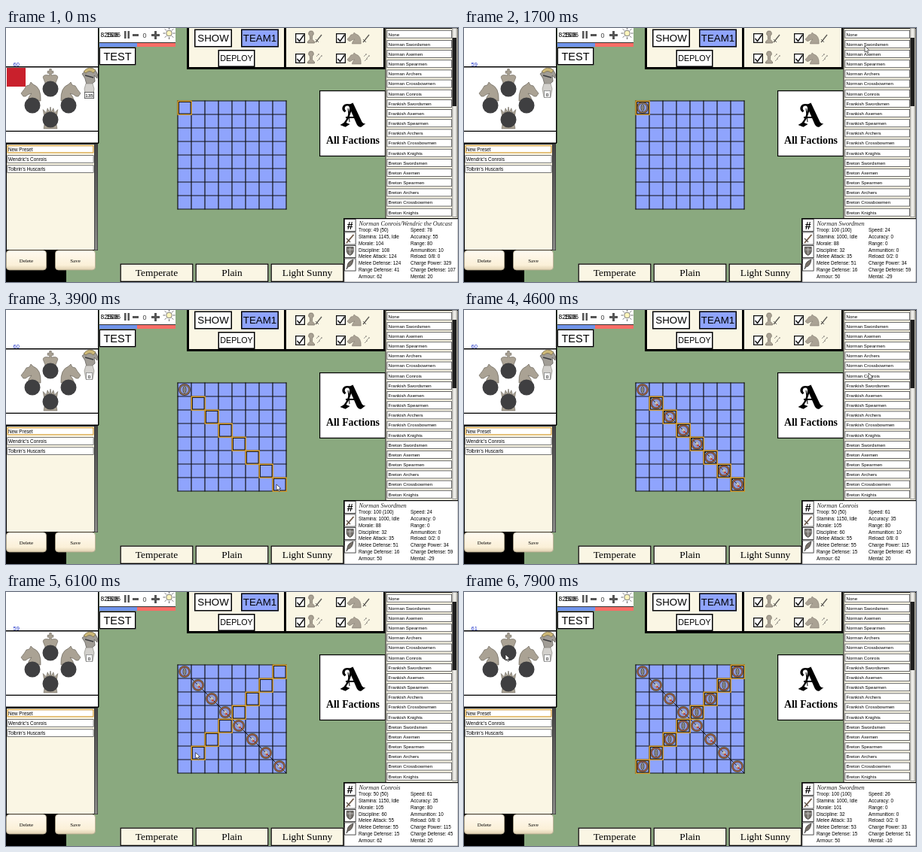
These frames come from a looping animation (600x338 px, 8 s). An HTML page with a canvas:

```html
<!DOCTYPE html>
<html lang="en">
<head>
<meta charset="utf-8">
<title>Deployment screen</title>
<style>
html, body { margin: 0; width: 100%; height: 100%; overflow: hidden; background: #8aa97f; }
canvas { display: block; }
</style>
</head>
<body>
<canvas id="stage" width="600" height="338"></canvas>
<script>
const g = document.getElementById('stage').getContext('2d');
const LOOP = 8000;
const SANS = '"Liberation Sans", Arial, sans-serif';
const SERIF = '"Liberation Serif", "Times New Roman", serif';
const CREAM = '#faf6e4', BLUE = '#8fa4fd', TAN = '#aaa294', EDGE = '#6b655b', DARK = '#3f3f41', GOLD = '#e5a62b';
const GRID = { x: 228, y: 97, cell: 18, n: 8 };

const ranks = ['Swordsmen', 'Axemen', 'Spearmen', 'Archers', 'Crossbowmen'];
const troops = ['None'];
for (const [people, riders] of [['Norman', 'Conrois'], ['Frankish', 'Knights'], ['Breton', 'Knights']])
  for (const r of [...ranks, riders]) troops.push(people + ' ' + r);

const cards = {
  lord: ['Norman Conrois/Wendric the Outcast',
    'Troop: 49 (50)|Stamina: 1145, Idle|Morale: 104|Discipline: 108|Melee Attack: 124|Melee Defense: 124|Range Defense: 41|Armour: 62',
    'Speed: 78|Accuracy: 55|Range: 80|Ammunition: 10|Reload: 0/8: 0|Charge Power: 329|Charge Defense: 107|Mental: 20'],
  sword: ['Norman Swordmen',
    'Troop: 100 (100)|Stamina: 1000, Idle|Morale: 88|Discipline: 32|Melee Attack: 35|Melee Defense: 51|Range Defense: 16|Armour: 50',
    'Speed: 24|Accuracy: 0|Range: 0|Ammunition: 0|Reload: 0/2: 0|Charge Power: 34|Charge Defense: 59|Mental: -29'],
  horse: ['Norman Conrois',
    'Troop: 50 (50)|Stamina: 1150, Idle|Morale: 105|Discipline: 60|Melee Attack: 55|Melee Defense: 55|Range Defense: 15|Armour: 62',
    'Speed: 61|Accuracy: 35|Range: 80|Ammunition: 10|Reload: 0/8: 0|Charge Power: 115|Charge Defense: 45|Mental: 20'],
  guard: ['Norman Swordmen',
    'Troop: 100 (100)|Stamina: 1000, Idle|Morale: 101|Discipline: 32|Melee Attack: 33|Melee Defense: 53|Range Defense: 15|Armour: 50',
    'Speed: 26|Accuracy: 0|Range: 0|Ammunition: 0|Reload: 0/2: 0|Charge Power: 33|Charge Defense: 51|Mental: -10']
};

// Moments of the clicks
const PICK1 = 1200, CLEAR = 2500, PICK2 = 4500, NEXT = 5050, PICK3 = 7200;

// Pointer path: time, x, y
const path = [
  [200, 240, 108], [1050, 532, 22], [1700, 533, 27], [2550, 250, 118], [3200, 307, 175],
  [3800, 362, 231], [3900, 360, 235], [4400, 538, 87], [4600, 538, 87], [5000, 362, 103],
  [5200, 341, 124], [6250, 238, 232], [6900, 509, 55], [7150, 534, 22], [7300, 534, 22], [7900, 56, 86]
];

function pointer(t) {
  if (t < path[0][0]) return null;
  for (let i = 1; i < path.length; i++) {
    const [t0, x0, y0] = path[i - 1], [t1, x1, y1] = path[i];
    if (t <= t1) {
      let k = (t - t0) / (t1 - t0);
      if (Math.hypot(x1 - x0, y1 - y0) > 150) k = k * k * (3 - 2 * k);
      return [x0 + (x1 - x0) * k, y0 + (y1 - y0) * k];
    }
  }
  return path[path.length - 1].slice(1);
}

function box(x, y, w, h, fill, line = '#000', lw = 1) {
  g.fillStyle = fill;
  g.fillRect(x, y, w, h);
  if (!lw) return;
  g.strokeStyle = line;
  g.lineWidth = lw;
  g.strokeRect(x + lw / 2, y + lw / 2, w - lw, h - lw);
}

function text(s, x, y, size, family = SANS, align = 'left', color = '#000', style = '') {
  g.font = `${style} ${size}px ${family}`;
  g.textAlign = align;
  g.fillStyle = color;
  g.fillText(s, x, y);
}

function disc(x, y, r, fill) {
  g.beginPath();
  g.arc(x, y, r, 0, 7);
  g.fillStyle = fill;
  g.fill();
}

function line(pts, color, lw) {
  g.beginPath();
  pts.forEach(([x, y]) => g.lineTo(x, y));
  g.strokeStyle = color;
  g.lineWidth = lw;
  g.stroke();
}

function shape(d, x, y, sx, sy, fill, edge) {
  const p = new Path2D(d);
  g.save();
  g.translate(x, y);
  g.scale(sx, sy);
  g.fillStyle = fill;
  g.fill(p);
  if (edge) {
    g.strokeStyle = edge;
    g.lineWidth = 0.7;
    g.stroke(p);
  }
  g.restore();
}

const HORSE = 'M13 0 L16 3 Q27 7 26 25 L9 25 Q9 20 14 15 Q9 16 6 19 L3 19 L0 15 Q5 9 7 5 L11 4 Z';
const KING = 'M10 0h3v3h3v3h-3v3q10-2 10 3l-4 9h-15l-4-9q0-5 10-3v-3h-3v-3h3z';
const CROWN = 'M0 4 L5 9 L7 2 L10 8 L11.5 0 L13 8 L16 2 L18 9 L23 4 L20 21 L22 33 H1 L3 21 Z';
const PAWN = 'M5 0 A3.2 3.2 0 0 1 7 6 L6.5 11 L10 14 V16 H0 V14 L3.5 11 L3 6 A3.2 3.2 0 0 1 5 0 Z';
const ARROW = 'M0 0 L0 8 L2 6.4 L3.4 9.4 L4.8 8.8 L3.4 5.9 L6 5.7 Z';

function commander(t) {
  box(0, 0, 123, 152.5, '#fff', '#000', 0);
  g.fillStyle = '#000';
  g.fillRect(0, 51, 123, 1.5);
  g.fillRect(0, 136.7, 123, 1.3);
  g.fillRect(122, 0, 1.5, 153);
  const fps = t < 900 ? 60 : t < 3500 ? 59 : t < 6000 ? 60 : t < 7300 ? 59 : 61;
  text(fps, 9.5, 51, 7.5, SANS, 'left', '#2438c8');
  if (t < PICK1) box(1, 53, 25, 25, '#c9202c', '#000', 0);

  shape(HORSE, 20, 72, 1, 1, TAN, EDGE);
  shape(HORSE, 99, 72, -1, 1, TAN, EDGE);
  shape(KING, 49.2, 54.5, 0.85, 0.95, TAN, EDGE);
  shape(CROWN, 49.2, 105, 0.85, 0.88, TAN, EDGE);
  for (const [x, y] of [[35, 103], [59, 81], [83, 103], [59, 122]]) disc(x, y, 10.5, DARK);

  shape('M5 4 Q13 -3 19 4 Q23 8 21 14 L17 10 L18 18 L13 22 L6 21 L4 14 L0 8 Z', 101, 53, 0.95, 1, '#a19d96', '#55524e');
  shape('M0 5 Q7 -4 16 3 L13 7 Q8 2 3 7 Z', 103, 53, 1, 1, '#cdb877', '#6a6048');
  line([[105, 63], [116, 66]], '#3a3b3e', 1.6);
  shape('M3 0 H12 L14 7 L12 18 H3 L1 7 Z', 103, 74, 1, 1, '#d2d0cc', '#8d8b86');
  if (t < PICK1) {
    box(104, 85, 13, 9, '#f4f4f4', '#444', 0.8);
    text('135', 110.5, 92, 6.2, SANS, 'center');
  } else {
    box(106, 83, 9, 10, '#f4f4f4', '#888', 0.8);
    text('0', 110.5, 90.5, 6.2, SANS, 'center');
  }
}

function presets() {
  g.fillStyle = '#000';
  g.fillRect(0, 152, 123, 2);
  g.fillRect(0, 153, 80, 185);
  box(0, 154, 118, 142, CREAM);
  const shade = g.createLinearGradient(0, 154, 0, 296);
  shade.addColorStop(0, '#444');
  shade.addColorStop(1, '#8a8a88');
  box(117, 154, 5, 142, shade, '#333', 0.7);
  ['New Preset', "Wendric's Conrois", "Tolbrin's Huscarls"].forEach((s, i) => {
    const y = 156 + i * 13.2;
    box(1.5, y, 115, 10.5, '#fff', i ? '#555' : '#d9a441', i ? 0.8 : 1.3);
    text(s, 3, y + 7.8, 6.3);
  });
  for (const [s, x] of [['Delete', 0], ['Save', 65]]) {
    g.beginPath();
    g.roundRect(x + 0.5, 296, 53, 26, 4);
    const fade = g.createLinearGradient(0, 296, 0, 322);
    fade.addColorStop(0, '#fffaf0');
    fade.addColorStop(0.75, '#fbf0d8');
    fade.addColorStop(1, '#dfd0b0');
    g.fillStyle = fade;
    g.fill();
    g.strokeStyle = '#b5aa91';
    g.lineWidth = 0.8;
    g.stroke();
    text(s, x + 27, 312.3, 7, SERIF, 'center');
  }
}

function clockBar() {
  box(124, 0, 101, 20, '#fff', '#000', 0);
  text('82506', 125.5, 11.5, 8.5);
  text('1506', 133, 11.5, 8.5);
  g.fillStyle = '#555';
  g.fillRect(157, 4, 2.5, 10);
  g.fillRect(161.5, 4, 2.5, 10);
  g.fillRect(168, 8, 8, 3);
  g.fillRect(193, 8, 11, 3);
  g.fillRect(197, 4, 3, 11);
  text('0', 184, 13, 9, SANS, 'center', '#444');
  for (let i = 0; i < 8; i++) {
    const c = Math.cos(i * Math.PI / 4), s = Math.sin(i * Math.PI / 4);
    line([[216.5 + 5 * c, 7 + 5 * s], [216.5 + 8 * c, 7 + 8 * s]], '#666', 1);
  }
  disc(216.5, 7, 4, '#666');
  disc(216.5, 7, 3.2, '#fff6bd');
  box(124, 20, 50, 5, '#6f93ea', '#000', 0);
  box(174, 20, 51, 5, '#f76d66', '#000', 0);
  g.fillStyle = '#000';
  g.fillRect(124, 19, 101, 0.8);
  box(123.5, 25.5, 49, 24, '#fff', '#000', 1.5);
  text('TEST', 148, 43, 14.5, SANS, 'center');
}

function blade(x, y) {
  line([[x, y + 10], [x + 8, y]], '#5b5954', 1.3);
  line([[x, y + 6], [x + 4, y + 10]], '#5b5954', 1);
}

function darts(x, y) {
  for (const [dx, dy] of [[0, 0], [4, 2], [1, 6]]) {
    line([[x + dx, y + dy + 3], [x + dx + 3, y + dy]], '#85817a', 0.8);
    disc(x + dx + 3, y + dy, 0.8, '#77736c');
  }
}

function toolbar() {
  box(240, -4, 132, 59, CREAM, '#000', 3);
  box(369, -4, 135, 59, CREAM, '#000', 3);
  const button = (s, x, y, w, h, size, fill) => {
    box(x, y, w, h, fill, '#000', 1.5);
    text(s, x + w / 2, y + h / 2 + size * 0.36, size, SANS, 'center');
  };
  button('SHOW', 250, 1.5, 50, 24, 13.3, '#fff');
  button('TEAM1', 312, 1.5, 50, 24, 13.3, BLUE);
  button('DEPLOY', 281.5, 29, 49, 23, 10.7, '#fff');
  for (const y of [7, 34]) {
    for (const x of [384, 438]) {
      box(x, y, 13, 13, '#fff', '#111', 1.3);
      line([[x + 2.5, y + 7], [x + 5.5, y + 10.5], [x + 11.5, y + 2]], '#111', 1.4);
    }
    shape(PAWN, 400.5, y - 3, 0.9, 1, TAN, EDGE);
    shape(HORSE, 453, y - 1, 0.7, 0.6, TAN, EDGE);
    if (y < 20) { blade(411, y + 2); blade(474, y + 2); }
    else { darts(412, y + 1); darts(475, y + 1); }
  }
}

function factions() {
  box(416, 83, 88, 88, '#fff', '#000', 1.2);
  const glyph = ['M11 3 L17 0 L29 26 Q31 29 34 28 L28 33 Q24 33 22 29 Z',
    'M16 6 Q13 20 8 27 L13 29 L7 33 L0 30 L5 27 Q11 20 13 5 Z',
    'M14 2 Q5 0 3 6 Q2 10 6 13 L8 11 Q5 8 7 5 Q9 3 13 5 Z'];
  for (const d of glyph) shape(d, 443.5, 99.5, 1, 0.98, '#000');
  line([[451, 119], [468, 119]], '#000', 2);
  line([[454, 107], [456, 125]], '#000', 1);
  text('All Factions', 460.5, 154, 13.8, SERIF, 'center', '#000', 'bold');
}

function troopList() {
  box(503.5, 0, 97, 254, CREAM, '#000', 1);
  troops.forEach((s, i) => {
    const y = 2.8 + i * 13.17;
    box(505.5, y, 86.5, 10.8, '#fff', '#444', 0.8);
    text(s, 507.5, y + 7.8, 6.1);
  });
  box(592.5, 0, 6, 252, '#ecebe6', '#777', 0.7);
  box(592.5, 13, 5.5, 91, '#1e1e1e', '#000', 0);
}

function card([title, left, right]) {
  box(448, 253, 153, 86, '#fff', '#000', 1.2);
  for (let i = 0; i < 4; i++) box(449, 254 + i * 17.5, 15.5, 17, '#fff', '#222', 0.8);
  text('#', 456.7, 267.5, 14, SANS, 'center', '#000', 'bold');
  line([[452, 286], [461.5, 275]], '#6f5744', 1.8);
  line([[452, 280], [457, 285]], '#55504b', 1.3);
  shape('M0 0 H9 V6 Q8 10 4.5 11 Q1 10 0 6 Z', 452.2, 291.5, 1, 1, '#77736d', '#333');
  line([[453, 295], [461, 295]], '#ccc', 0.8);
  line([[456.7, 292], [456.7, 301]], '#ccc', 0.8);
  shape('M9 0 Q1 3 1 9 L0 13 L2 10 Q8 9 9 0 Z', 452, 308, 1, 1, '#777069', '#333');
  text(title, 468.5, 263, 8.2, SERIF, 'left', '#222', 'italic');
  left.split('|').forEach((s, i) => text(s, 468, 271 + i * 8.87, 6.3));
  right.split('|').forEach((s, i) => text(s, 537, 271 + i * 8.87, 6.3));
}

function unit(col, row, mounted, fresh) {
  const { x, y, cell } = GRID;
  const cx = x + col * cell + 9, cy = y + row * cell + 9;
  if (mounted) line([[cx - 9, cy - 9], [cx + 9, cy + 9]], '#111', 1);
  disc(cx, cy, 8, fresh ? '#4c3b34' : '#55603f');
  disc(cx, cy, 7.1, fresh ? '#a07d5c' : '#b05440');
  disc(cx, cy, 6, '#544a45');
  disc(cx, cy, 5.3, '#8d9ce0');
  if (mounted) {
    line([[cx - 3.5, cy - 3.5], [cx + 4, cy + 4]], '#222', 1);
    shape(HORSE, cx - 2.5, cy - 3.5, 0.2, 0.28, '#c8c3ba', '#333');
    disc(cx + 1.5, cy + 2.3, 1.3, '#c63c35');
  } else {
    g.beginPath();
    g.ellipse(cx, cy, 2, 4.6, 0, 0, 7);
    g.fillStyle = '#aaa69c';
    g.fill();
    g.strokeStyle = '#444';
    g.lineWidth = 0.9;
    g.stroke();
    line([[cx, cy - 3], [cx, cy + 3]], '#555', 0.8);
  }
}

function mark(col, row) {
  const px = GRID.x + col * GRID.cell, py = GRID.y + row * GRID.cell;
  g.strokeStyle = GOLD;
  g.lineWidth = 1.4;
  g.strokeRect(px + 0.2, py + 0.2, 18, 18);
  g.strokeStyle = '#1c1a16';
  g.lineWidth = 1;
  g.strokeRect(px + 1.5, py + 1.5, 15.5, 15.5);
}

function field(t) {
  const { x, y, cell, n } = GRID, size = cell * n;
  box(x, y, size, size, BLUE, '#000', 0);
  for (let i = 0; i <= n; i++) {
    const d = i * cell;
    line([[x + d, y - 0.5], [x + d, y + size + 0.5]], '#111', 1.2);
    line([[x - 0.5, y + d], [x + size + 0.5, y + d]], '#111', 1.2);
  }
  if (t >= PICK1) unit(0, 0, false, t < PICK2);
  if (t < CLEAR) mark(0, 0);
  for (let i = 1; i < n; i++) {
    if (t >= PICK2) unit(i, i, true, false);
    if (t >= 2450 + 200 * i && t < NEXT) mark(i, i);
  }
  for (let i = 0; i < n; i++) {
    if (t >= PICK3) unit(n - 1 - i, i, false, false);
    if (t >= NEXT + 170 * i) mark(n - 1 - i, i);
  }
}

function draw(t) {
  g.fillStyle = '#8aa97f';
  g.fillRect(0, 0, 600, 338);
  presets();
  commander(t);
  clockBar();
  toolbar();
  field(t);
  factions();
  troopList();
  card(t < PICK1 ? cards.lord : t < PICK2 ? cards.sword : t < PICK3 ? cards.horse : cards.guard);
  ['Temperate', 'Plain', 'Light Sunny'].forEach((s, i) => {
    box(151.5 + i * 100, 313.5, 97, 24.5, CREAM, '#000', 1.3);
    text(s, 200 + i * 100, 330.3, 13.4, SERIF, 'center');
  });
  const p = pointer(t);
  if (p) shape(ARROW, p[0] - 1, p[1] - 3, 1, 1, '#fff', '#222');
}

const start = performance.now();
function tick() {
  draw((performance.now() - start) % LOOP);
  requestAnimationFrame(tick);
}
tick();
</script>
</body>
</html>
```
